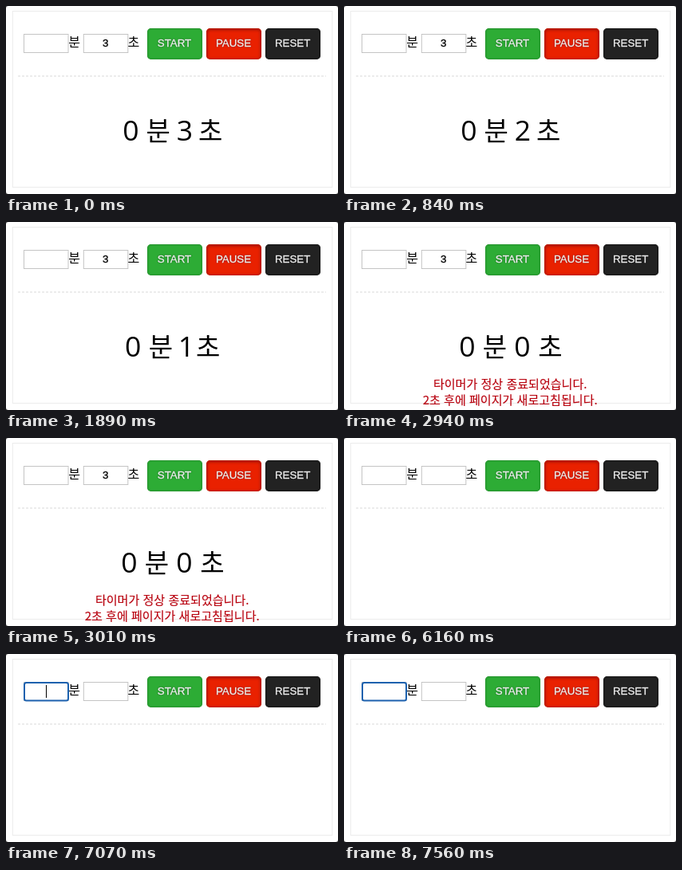
Animation of 416 by 236 pixels, one loop 8 s. Source, as an HTML page:

```html
<!DOCTYPE html>
<html lang="ko">
<head>
<meta charset="utf-8">
<title>Timer</title>
<style>
html, body { margin: 0; width: 100%; height: 100%; overflow: hidden; background: #fff; }
.button { position: absolute; top: 27.5px; width: 69px; height: 39px; border-radius: 5px; }
.start { left: 176.5px; background: #2dac35; box-shadow: inset 0 0 2px 1px #22902b, 0 0 1px #8fb592; }
.pause { left: 250.5px; background: #e92100; box-shadow: inset 0 1px 3px 2px #b51700, 0 0 1px #c99a94; }
.reset { left: 324.5px; background: #222; box-shadow: inset 0 0 2px 1px #151515, 0 0 1px #888; }
svg { position: absolute; left: 0; top: 0; width: 416px; height: 236px; }
text { text-anchor: middle; font-family: "Noto Sans CJK KR", "Noto Sans CJK", sans-serif; }
.latin { font: 13.33px "Liberation Sans", Arial, sans-serif; stroke-width: .3px; }
.caption { fill: #fff; stroke: #fff; text-shadow: 0 0 2px #0006; }
.label { font-size: 16px; }
.hangul { font-size: 33px; }
.digit { font: 35.5px "Open Sans", "Noto Sans", sans-serif; }
.note { font-size: 15.05px; fill: #b8000e; stroke: #b8000e; stroke-width: .15px; }
.field { fill: #fff; stroke: #c4c4c4; }
</style>
</head>
<body>
<div class="button start"></div>
<div class="button pause"></div>
<div class="button reset"></div>
<svg viewBox="0 0 416 236">
  <path d="M0 3V0H3A3 3 0 0 0 0 3M413 0h3v3a3 3 0 0 0-3-3M0 233v3h3a3 3 0 0 1-3-3M416 233v3h-3a3 3 0 0 0 3-3" fill="#444"/>
  <rect x="8.3" y="6.5" width="400.5" height="221" fill="none" stroke="#ececec"/>
  <path d="M15 88H401" stroke="#d9d9d9" stroke-dasharray="3 2"/>
  <rect class="field" x="22.5" y="35.5" width="55.5" height="23"/>
  <rect class="field" x="97.3" y="35.5" width="55.5" height="23"/>
  <text class="label" x="85.6" y="50.7">분</text>
  <text class="label" x="159.8" y="50.7">초</text>
  <text class="latin caption" x="211" y="51">START</text>
  <text class="latin caption" x="285" y="51">PAUSE</text>
  <text class="latin caption" x="359.2" y="51">RESET</text>
  <text id="entry" class="latin" x="124.7" y="51.3" stroke="#000">3</text>
  <rect id="ring" x="23" y="36" width="55" height="22.5" rx="2.5" fill="#fff" stroke="#1c61ae" stroke-width="2"/>
  <path id="caret" d="M50.5 39V55" stroke="#000"/>
  <g id="clock">
    <text class="digit" y="168.8">0</text>
    <text class="hangul" y="168.8">분</text>
    <text class="digit" y="168.8"></text>
    <text class="hangul" y="168.8">초</text>
  </g>
  <g id="notes">
    <text class="note" x="208.2" y="209">타이머가 정상 종료되었습니다.</text>
    <text class="note" x="208.2" y="228.7">2초 후에 페이지가 새로고침됩니다.</text>
  </g>
</svg>
<script>
const LOOP = 8000, RESET = 6160, FOCUS = 7070, BLINK = 7560;
const ticks = [840, 1890, 2940];
// Glyph centres for each remaining second
const centres = [
  [154.5, 189, 223.3, 258.5],
  [159.2, 194, 226, 253.3],
  [156.3, 190.8, 224, 256.3],
  [156.3, 190.8, 224, 256.2]
];
const $ = id => document.getElementById(id);
const glyphs = [...$("clock").children];
const show = (id, on) => $(id).setAttribute("visibility", on ? "visible" : "hidden");

function draw(t) {
  const left = 3 - ticks.filter(at => t >= at).length;
  const running = t < RESET;
  glyphs.forEach((g, i) => g.setAttribute("x", centres[left][i]));
  glyphs[2].textContent = left;
  show("clock", running);
  show("entry", running);
  show("notes", running && left === 0);
  show("ring", t >= FOCUS);
  show("caret", t >= FOCUS && t < BLINK);
}

const begin = performance.now();
function tick() {
  draw((performance.now() - begin) % LOOP);
  requestAnimationFrame(tick);
}
draw(0);
requestAnimationFrame(tick);
</script>
</body>
</html>
```
